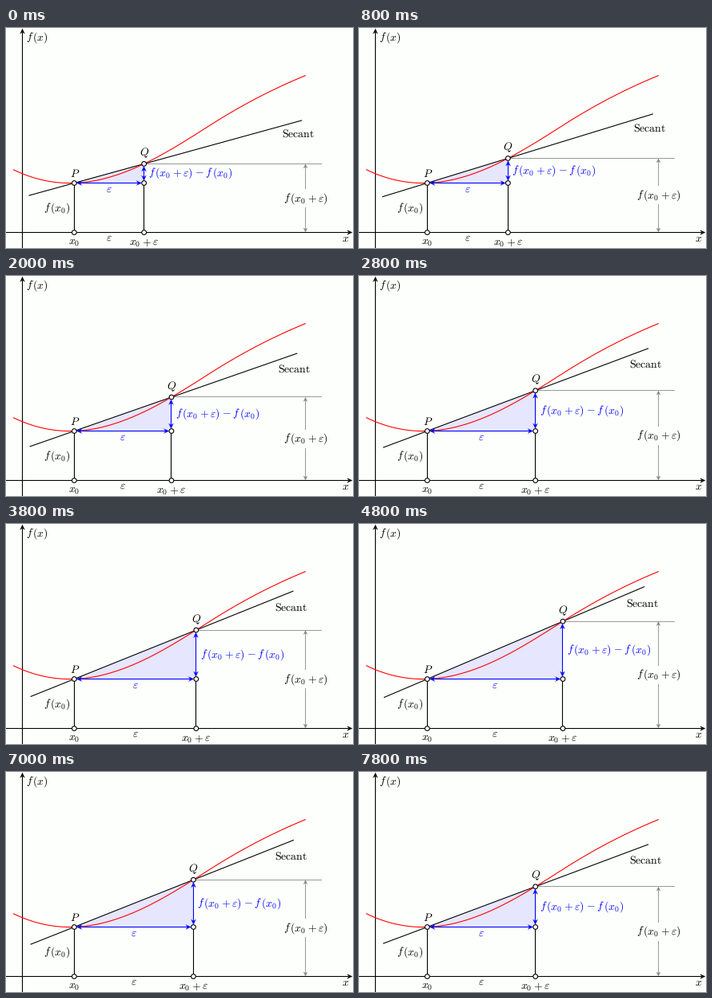
Animation, 434 px wide and 276 px high, one loop 8 s. Source, as a matplotlib script:

```python
import numpy as np
import matplotlib.pyplot as plt
from matplotlib.animation import FuncAnimation
from matplotlib.patches import Circle, Polygon, Rectangle

W, H, DPI = 434, 276, 64
PT = 72 / DPI                      # points per pixel
FRAMES, INTERVAL = 40, 200
PAPER, BLUE, GRAY, FILL = "#fdfffc", "#0000ff", "#808080", "#e6e6ff"
EM, THICK, THIN = 13.8, 1.1, 0.8

AXIS_X, AXIS_Y = 20.5, 256.5
PX, PY = 85.35, 194.5
EPS_START, EPS_STEP = 87.3, 3.43
BACK, AHEAD = 59, 295.5            # secant reach on either side of P
GUIDE_X, GUIDE_END = 374.5, 395

# Curve knots relative to P: offset, rise, slope
KNOTS = np.array([
    (-76, 16.7, -0.486),
    (0, 0, 0.033),
    (87.5, 24.2, 0.479),
    (170, 72.6, 0.64),
    (289, 134.8, 0.41),
])

# Label pieces, with the italic correction after f and a gap after x_0
F = r"f\hspace{0.14}("
X0 = r"x_0\hspace{0.05}"
F_X0 = F + X0 + ")"
F_X0_EPS = F + X0 + r"+\varepsilon)"
RISE = F_X0_EPS + r"\hspace{0.03}-\hspace{0.03}" + F_X0

plt.rcParams.update({
    "mathtext.fontset": "cm",
    "text.hinting": "none",
    "toolbar": "None",
})

fig = plt.figure(figsize=(W / DPI, H / DPI), dpi=DPI, facecolor=PAPER)
ax = fig.add_axes([0, 0, 1, 1])


def rise(u):
    """Cubic Hermite curve through the knots."""
    u = np.asarray(u, float)
    x, y, m = KNOTS.T
    i = np.clip(np.searchsorted(x, u) - 1, 0, len(x) - 2)
    d = x[i + 1] - x[i]
    s = (u - x[i]) / d
    return ((1 + 2 * s) * (1 - s) ** 2 * y[i] + s * (1 - s) ** 2 * d * m[i]
            + s * s * (3 - 2 * s) * y[i + 1] + s * s * (s - 1) * d * m[i + 1])


def crisp(a, b):
    """Centre upright and level lines on a row of pixels."""
    a, b = np.array(a, float), np.array(b, float)
    same = a == b
    a[same] = b[same] = np.floor(a[same]) + 0.5
    return a, b


def line(a, b, color="black", width=THICK, z=2):
    a, b = crisp(a, b)
    ax.plot([a[0], b[0]], [a[1], b[1]], color=color, lw=width * PT,
            solid_capstyle="butt", snap=False, zorder=z)


def head(tip, way, color, size, z):
    """Stealth arrow head at tip, pointing along way."""
    side = np.array([-way[1], way[0]])
    back = tip - size * way
    pts = [tip, back + 0.46 * size * side, tip - 0.66 * size * way,
           back - 0.46 * size * side]
    ax.add_patch(Polygon(pts, fc=color, ec=color, lw=0.3 * PT, zorder=z))


def arrow(a, b, color="black", width=THICK, size=6.2, both=False, z=2):
    a, b = crisp(a, b)
    way = (b - a) / np.hypot(*(b - a))
    start = a + 0.6 * size * way if both else a
    line(start, b - 0.6 * size * way, color, width, z)
    head(b, way, color, size, z)
    if both:
        head(a, -way, color, size, z)


def label(x, y, text, ha="center", color="black"):
    ax.text(x, y, f"${text}$", ha=ha, va="baseline", color=color,
            fontsize=EM * PT, zorder=8)


def dot(x, y):
    ax.add_patch(Circle((x, y), 2.85, fc="white", ec="black",
                        lw=1.1 * PT, zorder=7))


def draw_axes():
    arrow((AXIS_X, H), (AXIS_X, 1))
    arrow((0, AXIS_Y), (433, AXIS_Y))
    label(25, 16, F + "x)", "left")
    label(425, 268.3, "x")


def draw_secant(eps, h):
    way = np.array([eps, -h]) / np.hypot(eps, h)
    p = np.array([PX, PY])
    line(p - BACK * way, p + AHEAD * way, z=3)
    x, y = p + 257 * way
    label(x + 32.7, y + 11.5, r"\mathrm{Secant}")


def draw_guides(qx, qy):
    line((qx, qy), (GUIDE_END, qy), GRAY, THIN)
    arrow((GUIDE_X, qy + 0.4), (GUIDE_X, AXIS_Y - 0.6), GRAY, THIN, 5,
          both=True)
    mid = (qy + AXIS_Y) / 2
    ax.add_patch(Rectangle((GUIDE_X - 32, mid - 11.5), 64, 23,
                           fc=PAPER, ec="none", zorder=3))
    label(GUIDE_X, mid + 3.6, F_X0_EPS)


def draw(i):
    ax.clear()
    ax.set(xlim=(0, W), ylim=(H, 0))
    ax.axis("off")

    # The far end is held for two frames before turning back
    eps = EPS_START + EPS_STEP * min(i, 53 - i)
    h = float(rise(eps))
    qx, qy = PX + eps, PY - h
    mid = PX + eps / 2

    ax.add_patch(Polygon([(PX, PY), (qx, qy), (qx, PY)], fc=FILL,
                         ec="none", zorder=1))
    draw_axes()
    draw_guides(qx, qy)
    draw_secant(eps, h)

    u = np.linspace(KNOTS[0, 0], KNOTS[-1, 0], 200)
    ax.plot(PX + u, PY - rise(u), color="red", lw=THICK * PT, zorder=4)

    line((PX, PY), (PX, AXIS_Y))
    line((qx, PY), (qx, AXIS_Y))
    arrow((PX + 3.2, PY), (qx - 3.2, PY), BLUE, both=True, z=5)
    arrow((qx, qy + 3.2), (qx, PY - 3.2), BLUE, both=True, z=5)

    for x, y in [(PX, PY), (qx, qy), (qx, PY), (PX, AXIS_Y), (qx, AXIS_Y)]:
        dot(x, y)

    label(PX + 0.4, PY - 7.4, "P")
    label(qx, qy - 10, "Q")
    label(80.5, 229.8, F_X0, "right")
    label(PX, 270, "x_0")
    label(qx, 272.4, r"x_0+\varepsilon")
    label(mid, 266.8, r"\varepsilon")
    label(mid, 205.5, r"\varepsilon", color=BLUE)
    label(qx + 4.9, (qy + PY) / 2 + 3.5, RISE, "left", BLUE)
    return []


anim = FuncAnimation(fig, draw, frames=FRAMES, interval=INTERVAL,
                     init_func=lambda: draw(0), repeat=True, repeat_delay=0,
                     blit=False)
plt.show()
```
